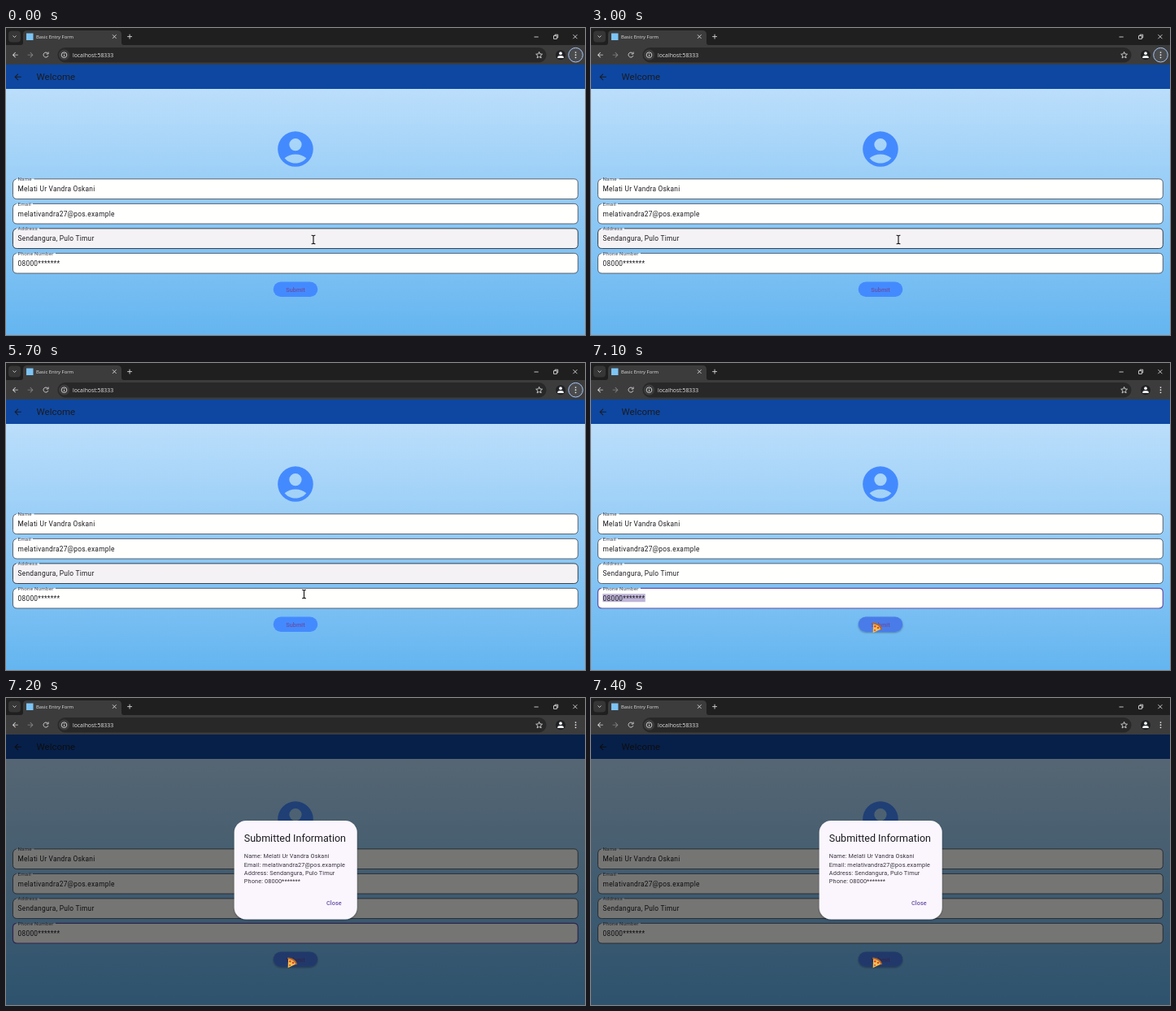
Recreate the animation shown at these times as an HTML page. Size 712x378 px, loop 8000 ms.

```html
<!DOCTYPE html>
<html lang="en">
<head>
<meta charset="utf-8">
<title>Form demo</title>
<style>
  html, body { margin: 0; width: 100%; height: 100%; overflow: hidden; background: #1f1f1f; }
  svg { display: block; width: 712px; height: 378px; }
  text { font-family: Roboto, sans-serif; fill: #1d1b20; white-space: pre; }
  .chrome text { font-family: "Open Sans", sans-serif; fill: #e3e3e3; }
  .line { fill: none; stroke: #d6d6d6; stroke-width: .9; }
  .title { font-size: 11.46px; }
  .value { font-size: 8.34px; letter-spacing: .26px; }
  .label { font-size: 6.25px; letter-spacing: .21px; fill: #49454f; }
  .button { font-size: 7.3px; font-weight: 500; letter-spacing: .05px; fill: #6750a4; }
  .heading { font-size: 12.5px; }
  .detail { font-size: 7.3px; letter-spacing: .13px; fill: #36323d; }
</style>
</head>
<body>
<svg viewBox="0 0 712 378">
  <defs>
    <linearGradient id="sky" x2="0" y2="1">
      <stop stop-color="#bbdefb"/><stop offset="1" stop-color="#64b5f0"/>
    </linearGradient>
    <path id="arrow" d="M20 11H7.83l5.59-5.59L12 4l-8 8 8 8 1.41-1.41L7.83 13H20z"/>
    <filter id="shadow" x="-20%" y="-20%" width="140%" height="150%">
      <feDropShadow dx="0" dy="1" stdDeviation="1.2" flood-opacity=".35"/>
    </filter>
  </defs>

  <g class="chrome">
    <rect width="712" height="45" fill="#1f1f1f"/>
    <path d="M0 21H18Q21 21 21 18V8Q21 3 26 3H137Q142 3 142 8V18Q142 21 145 21H712V45H0z" fill="#3c3c3c"/>
    <rect x="3" y="3.5" width="15" height="14" rx="4" fill="#363636"/>
    <rect x="25" y="6.5" width="8.5" height="8.5" fill="#7cc4f5"/>
    <text x="37" y="13.1" font-size="5.9">Basic Entry Form</text>
    <path class="line" d="M8.5 9.5l2 2 2-2M131 8.3l4.6 4.6m0-4.6l-4.6 4.6M149.2 10.6h5.8m-2.9-2.9v5.8
      M649.5 11h5.2M697.4 8.2l5 5m0-5l-5 5M673.5 9.6h3.8v3.8h-3.8zM675 9.4v-1.2h3.7v3.7h-1.2"/>
    <use href="#arrow" fill="#d6d6d6" transform="translate(6.2 28) scale(.43)"/>
    <use href="#arrow" fill="#858585" transform="translate(35.2 28) scale(-.43 .43)"/>
    <path class="line" d="M51.4 31.2A3 3 0 1 0 51.9 34M52.1 29.5v2.5h-2.5"/>
    <rect x="63.5" y="24" width="601" height="18.5" rx="9.2" fill="#282828"/>
    <circle cx="71.5" cy="33.2" r="6.6" fill="#3c3c3c"/>
    <circle class="line" cx="71.5" cy="33.2" r="3.3" stroke-width=".8"/>
    <path class="line" d="M71.5 31.3v.9m0 .7v2.2"/>
    <text x="82" y="35.7" font-size="6.85">localhost:58333</text>
    <path class="line" d="M655.6 29.4l1.1 2.6 2.8.2-2.1 1.9.7 2.8-2.5-1.5-2.5 1.5.7-2.8-2.1-1.9 2.8-.2z"/>
    <circle cx="682" cy="33.2" r="6" fill="#202124"/>
    <g fill="#f1f3f4"><circle cx="682" cy="31.2" r="1.9"/><path d="M678.2 37v-1q0-2 3.8-2t3.8 2v1z"/></g>
    <circle id="ring" cx="700.5" cy="33.2" r="8.8" fill="#4a4b4d" stroke="#a8c7fa" stroke-width="1"/>
    <g fill="#e3e3e3">
      <circle cx="700.5" cy="30.1" r=".9"/><circle cx="700.5" cy="33.2" r=".9"/><circle cx="700.5" cy="36.3" r=".9"/>
    </g>
  </g>

  <rect y="75" width="712" height="303" fill="url(#sky)"/>
  <rect y="45" width="712" height="30" fill="#0d47a1"/>
  <use href="#arrow" fill="#1d1b20" transform="translate(8.3 54.1) scale(.521)"/>
  <text class="title" x="37.6" y="64.2">Welcome</text>
  <path fill="#448aff" fill-rule="evenodd" transform="translate(329.8 122.9) scale(2.18)"
    d="M12 2a10 10 0 1 0 0 20a10 10 0 1 0 0-20zM12 6a3.5 3.5 0 1 1 0 7a3.5 3.5 0 1 1 0-7zM12 20c-2.03 0-4.43-.82-6.14-2.88C7.55 15.8 9.68 15 12 15s4.45.8 6.14 2.12C16.43 19.18 14.03 20 12 20z"/>
  <g id="fields"></g>
  <rect id="submit" x="328.7" y="312.5" width="54.6" height="18.5" rx="9.25"/>
  <text class="button" x="356" y="324.5" text-anchor="middle">Submit</text>

  <g id="dialog">
    <rect y="45" width="712" height="333" opacity=".54"/>
    <rect x="280.7" y="151" width="151" height="121.6" rx="14.6" fill="#fbf6fe" filter="url(#shadow)"/>
    <text class="heading" x="292.8" y="176.5">Submitted Information</text>
    <g id="details"></g>
    <text class="button" x="394" y="254.8">Close</text>
  </g>

  <path id="beam" d="M-2.4-5.3Q0-5.3 0-4Q0-5.3 2.4-5.3M0-4.5V4.5M-2.4 5.3Q0 5.3 0 4Q0 5.3 2.4 5.3"
    fill="none" stroke="#111" stroke-width="1.1"/>
  <g id="slice">
    <path d="M-4.2-5.6Q4-4.6 5.6 1.2L-4.6 6z" fill="#f6c04d"/>
    <path d="M-4.2-5.6Q4-4.6 5.6 1.2" fill="none" stroke="#b8682a" stroke-width="2" stroke-linecap="round"/>
    <g fill="#d9482f">
      <circle cx="-2" cy="-2" r="1.3"/><circle cx="1.7" cy="-.2" r="1.3"/><circle cx="-2.3" cy="2.8" r="1"/>
    </g>
  </g>
</svg>
<script>
const LOOP = 8000, MOVE = 5700, STEP = 100;
const $ = id => document.getElementById(id);
const show = (id, on) => $(id).style.display = on ? '' : 'none';

// label, value, end of the gap in the outline
const data = [
  ['Name', 'Melati Ur Vandra Oskani', 34.5],
  ['Email', 'melativandra27@pos.example', 33],
  ['Address', 'Sendangura, Pulo Timur', 41],
  ['Phone Number', '08000*******', 61]
];
const outline = (y, gap) => `M${gap} ${y}H698.3q5 0 5 5v14.6q0 5-5 5H13.5q-5 0-5-5V${y + 5}q0-4 4-5`;

$('fields').innerHTML = data.map(([label, value, gap], i) => {
  const y = 185.9 + i * 30.5;
  return `<rect id="fill${i}" x="8.5" y="${y}" width="694.8" height="24.6" rx="5"/>
    <path id="edge${i}" d="${outline(y, gap)}" fill="none"/>
    ${i == 3 ? `<rect id="selection" x="14.4" y="${y + 6.8}" width="52.4" height="10" fill="#6750a4" opacity=".42"/>` : ''}
    <text class="label" x="14.4" y="${y + 2.1}">${label}</text>
    <text class="value" x="14.6" y="${y + 15.3}">${value}</text>`;
}).join('');

$('details').innerHTML = data.map(([label, value], i) =>
  `<text class="detail" x="292.8" y="${197.1 + i * 10.43}">${label.split(' ')[0]}: ${value}</text>`).join('');

const path = [[378, 260.5], [366.5, 284.5], [361, 299], [355, 314], [352.5, 322], [351.5, 325], [351.3, 326.2]];

function draw(t) {
  const step = Math.max(0, Math.min(path.length - 1, Math.floor((t - MOVE) / STEP) + 1));
  const [x, y] = path[step];
  const overForm = step < 3, overButton = step > 2;
  const hovered = step < 2 ? 2 : overForm ? 3 : -1;
  const focused = t >= 7000 && t < 7300;

  data.forEach((_, i) => {
    const focus = focused && i == 3;
    $('fill' + i).setAttribute('fill', i == hovered ? '#f4f2f4' : '#fffffd');
    $('edge' + i).setAttribute('stroke', focus ? '#6750a4' : i == hovered ? '#1d1b20' : '#45454c');
    $('edge' + i).setAttribute('stroke-width', focus ? 1.2 : .8);
  });
  $('submit').setAttribute('fill', t >= 7000 ? '#487ce9' : overButton ? '#4786f8' : '#448aff');
  $('submit').setAttribute('filter', overButton ? 'url(#shadow)' : 'none');
  for (const id of ['beam', 'slice']) $(id).setAttribute('transform', `translate(${x} ${y})`);
  show('beam', overForm);
  show('slice', overButton);
  show('ring', t < 6800);
  show('selection', t >= 7000 && t < 7200);
  show('dialog', t >= 7200);
}

function tick() {
  draw(performance.now() % LOOP);
  requestAnimationFrame(tick);
}
tick();
</script>
</body>
</html>
```
